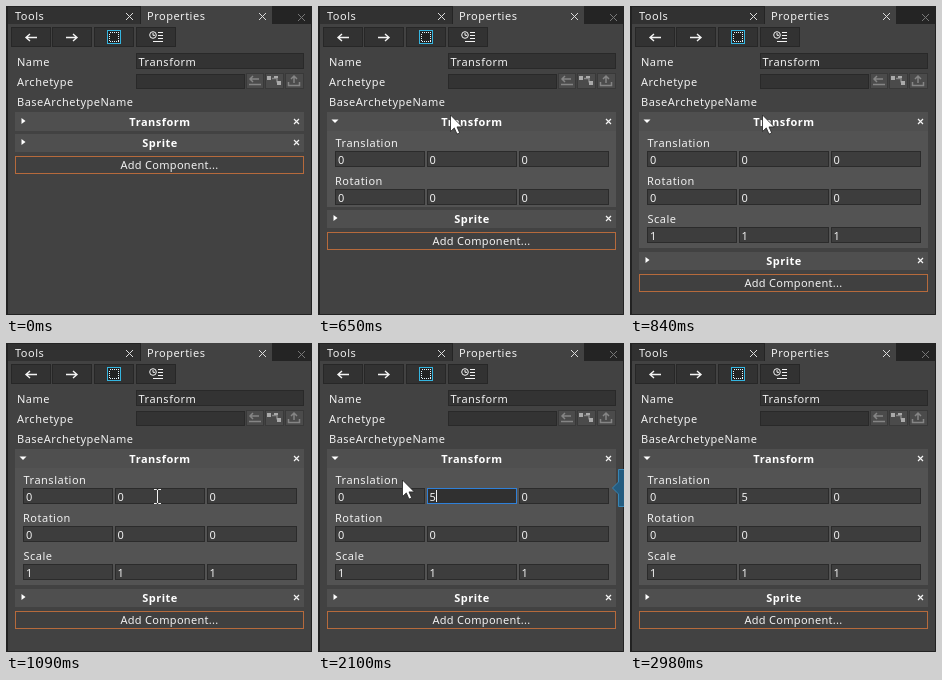
Write an HTML page that moves like this. It is 306 px wide and 309 px high and loops after 3900 ms.

```html
<!DOCTYPE html>
<html lang="en">
<head>
<meta charset="utf-8">
<title>Properties panel</title>
<style>
html, body { margin: 0; width: 100%; height: 100%; overflow: hidden; background: #424242; }
svg { display: block; width: 306px; height: 309px; }
text { font: 11px "Noto Sans", "Open Sans", sans-serif; letter-spacing: .5px; fill: #f0f0f0; white-space: pre; }
text.head { font-weight: 700; text-anchor: middle; fill: #fff; }
text.add { text-anchor: middle; letter-spacing: .3px; }
rect { shape-rendering: crispEdges; }
.panel { fill: #424242; }
.button { fill: #323232; stroke: #272727; }
.field { fill: #333; stroke: #292929; }
.value { fill: #3d3d3d; stroke: #2b2b2b; }
.mini { fill: #4b4b4b; stroke: #393939; }
.bar { fill: #4f4f4f; }
.line { fill: none; stroke: #f4f4f4; stroke-width: 1.4; }
.thin { fill: none; stroke: #f4f4f4; }
.dim { fill: none; stroke: #858585; stroke-width: 1.5; }

.lower, .cursor, .t { animation: 3900ms step-end infinite; }
.lower { animation-name: expand; }
.closed { animation-name: closed; }
.open { animation-name: open; }
.cursor { animation-name: move; }
.arrow { animation-name: arrow; }
.beam { animation-name: beam; }
.focus { animation-name: focus; }
.tip { animation-name: tip; }
.select { animation-name: select; }
.zero { animation-name: zero; }
.five { animation-name: five; }
.caret { animation-name: caret; }

@keyframes expand {
  0% { transform: translateY(0); }
  16.66% { transform: translateY(76px); }
  17.43% { transform: translateY(115px); }
  18.2% { transform: translateY(117px); }
  18.97%, 100% { transform: translateY(118px); }
}
@keyframes closed { 0% { opacity: 1; } 16.66%, 100% { opacity: 0; } }
@keyframes open { 0% { opacity: 0; } 16.66%, 100% { opacity: 1; } }
@keyframes move {
  0% { transform: translate(200px, 271px); }
  2.56% { transform: translate(200px, 271px); animation-timing-function: steps(9); }
  9.48% { transform: translate(139px, 128px); animation-timing-function: steps(6); }
  14.1% { transform: translate(132px, 109px); }
  21.79% { transform: translate(132px, 109px); animation-timing-function: steps(8); }
  27.94% { transform: translate(151px, 153px); }
  33.58% { transform: translate(151px, 153px); animation-timing-function: steps(7); }
  39.48% { transform: translate(84px, 137px); }
  67.43% { transform: translate(102px, 173px); animation-timing-function: steps(3); }
  69.74%, 100% { transform: translate(156px, 278px); }
}
@keyframes arrow {
  0% { opacity: 0; }
  2.56% { opacity: 1; }
  27.17% { opacity: 0; }
  36.4% { opacity: 1; }
  70.5%, 100% { opacity: 0; }
}
@keyframes beam { 0% { opacity: 0; } 27.17% { opacity: 1; } 36.4%, 100% { opacity: 0; } }
@keyframes focus { 0% { opacity: 0; } 31.28% { opacity: 1; } 76.4%, 100% { opacity: 0; } }
@keyframes tip { 0% { opacity: 0; } 31.28% { opacity: 1; } 67.43%, 100% { opacity: 0; } }
@keyframes select { 0% { opacity: 0; } 31.28% { opacity: 1; } 53.84%, 100% { opacity: 0; } }
@keyframes zero { 0% { opacity: 1; } 53.84%, 100% { opacity: 0; } }
@keyframes five { 0% { opacity: 0; } 53.84%, 100% { opacity: 1; } }
@keyframes caret { 0% { opacity: 0; } 53.84% { opacity: 1; } 76.4%, 100% { opacity: 0; } }
</style>
</head>
<body>
<svg viewBox="0 0 306 309">
  <defs>
    <path id="x" d="M-2.5-2.5l5 5m0-5l-5 5" fill="none" stroke-width="1.2"/>
    <path id="close" d="M-3.5-3.5l7 7m0-7l-7 7" fill="none"/>
    <g id="cells">
      <rect class="value" x="17.5" y=".5" width="89" height="15"/>
      <rect class="value" x="109.5" y=".5" width="89" height="15"/>
      <rect class="value" x="201.5" y=".5" width="89" height="15"/>
    </g>
  </defs>

  <rect class="panel" width="306" height="309"/>

  <!-- Tabs -->
  <rect width="306" height="18" fill="#242424"/>
  <rect x="1" y="1" width="133" height="17" fill="#313131"/>
  <rect class="panel" x="135" y="0" width="131" height="18"/>
  <text x="9" y="14">Tools</text>
  <text x="141" y="14">Properties</text>
  <use href="#close" x="123.5" y="10.5" stroke="#ddd"/>
  <use href="#close" x="256.5" y="10.5" stroke="#ddd"/>
  <use href="#close" x="295.5" y="11.5" stroke="#777"/>

  <!-- Toolbar -->
  <rect class="button" x="5.5" y="21.5" width="39" height="19"/>
  <rect class="button" x="46.5" y="21.5" width="39" height="19"/>
  <rect class="button" x="88.5" y="21.5" width="39" height="19"/>
  <rect class="button" x="130.5" y="21.5" width="39" height="19"/>
  <path class="line" d="M31 31.5H20m4-3.5l-4 3.5 4 3.5M60 31.5h11m-4-3.5l4 3.5-4 3.5"/>
  <rect x="101.5" y="24.5" width="13" height="13" fill="#222" stroke="#35b5df"/>
  <rect x="103.5" y="26.5" width="9" height="9" fill="none" stroke="#e8f8ff" stroke-dasharray="1 1"/>
  <circle class="thin" cx="147" cy="29" r="3.3"/>
  <path class="thin" d="M147 27v2.3h2M152 26.5h5M152 29.5h5M152 32.5h5M147 35.5h10"/>

  <!-- Object fields -->
  <text x="11" y="60">Name</text>
  <rect class="field" x="130.5" y="47.5" width="167" height="15"/>
  <text x="132.5" y="60">Transform</text>
  <text x="11" y="80">Archetype</text>
  <rect class="field" x="130.5" y="68.5" width="108" height="14"/>
  <rect class="mini" x="240.5" y="67.5" width="17" height="15"/>
  <rect class="mini" x="259.5" y="67.5" width="18" height="15"/>
  <rect class="mini" x="279.5" y="67.5" width="18" height="15"/>
  <path class="dim" d="M253 73h-9m3-3l-3 3 3 3M243 78.5h12"/>
  <path class="dim" d="M266 72.5h5v4"/>
  <path d="M261 70h4v4h-4zM271 75h4v4h-4zM268 70h4v2h-4z" fill="#aaa"/>
  <path class="dim" d="M288 77v-7m-3 3l3-3 3 3M282.5 76v3.5h11V76"/>
  <text x="11" y="100">BaseArchetypeName</text>

  <!-- Transform component -->
  <rect x="9" y="106" width="289" height="136" fill="#535353"/>
  <rect class="bar" x="9" y="106" width="289" height="19"/>
  <text class="head" x="154" y="120">Transform</text>
  <use href="#x" x="290.5" y="115.5" stroke="#f4f4f4"/>
  <path class="t closed" d="M15.5 112l4 3-4 3z" fill="#fff"/>
  <path class="t open" d="M13.5 113.5h7l-3.5 3.5z" fill="#fff"/>
  <text x="17.5" y="141">Translation</text>
  <use href="#cells" y="145"/>
  <text x="17" y="179">Rotation</text>
  <use href="#cells" y="183"/>
  <text x="17.5" y="217">Scale</text>
  <use href="#cells" y="221"/>
  <rect class="t focus" x="109.5" y="145.5" width="89" height="15" fill="#303030" stroke="#2f80d8"/>
  <rect class="t select" x="111" y="147" width="7" height="12" fill="#f08a20"/>
  <text x="20" y="158">0</text>
  <text class="t zero" x="111.5" y="158">0</text>
  <text class="t five" x="111.5" y="158">5</text>
  <rect class="t caret" x="118" y="147" width="1" height="12" fill="#f4f4f4"/>
  <text x="203.5" y="158">0</text>
  <text x="20" y="196">0</text>
  <text x="111.5" y="196">0</text>
  <text x="203.5" y="196">0</text>
  <text x="20" y="234">1</text>
  <text x="111.5" y="234">1</text>
  <text x="203.5" y="234">1</text>

  <!-- Everything below slides down as the component opens -->
  <g class="lower">
    <rect class="panel" y="125" width="306" height="190"/>
    <rect class="bar" x="9" y="128" width="289" height="18"/>
    <path d="M15.5 133l4 3-4 3z" fill="#fff"/>
    <text class="head" x="154" y="141">Sprite</text>
    <use href="#x" x="290.5" y="136.5" stroke="#f4f4f4"/>
    <rect x="9.5" y="150.5" width="288" height="17" fill="#404040" stroke="#b66a3c"/>
    <text class="add" x="163.5" y="163">Add Component...</text>
  </g>

  <!-- Window edges -->
  <path d="M1 0v308.5h304.5V0" fill="none" stroke="#222"/>
  <rect width="2" height="309" fill="#222"/>

  <path class="t tip" d="M307 126.5h-6.5V139l-6 6 6 6v12.5h6.5z" fill="#245c80" stroke="#3685b5"/>

  <g class="cursor">
    <path class="t arrow" d="M.5 0v16.5l3.8-3.6 2.7 6.2 2.7-1.2-2.7-6h5.3z" fill="#fff" stroke="#222" stroke-width=".8"/>
    <path class="t beam" d="M-3-6.5h2.5l1 1 1-1H4M-3 7.5h2.5l1-1 1 1H4M.5-6V7" fill="none" stroke="#f4f4f4"/>
  </g>
</svg>
</body>
</html>
```
